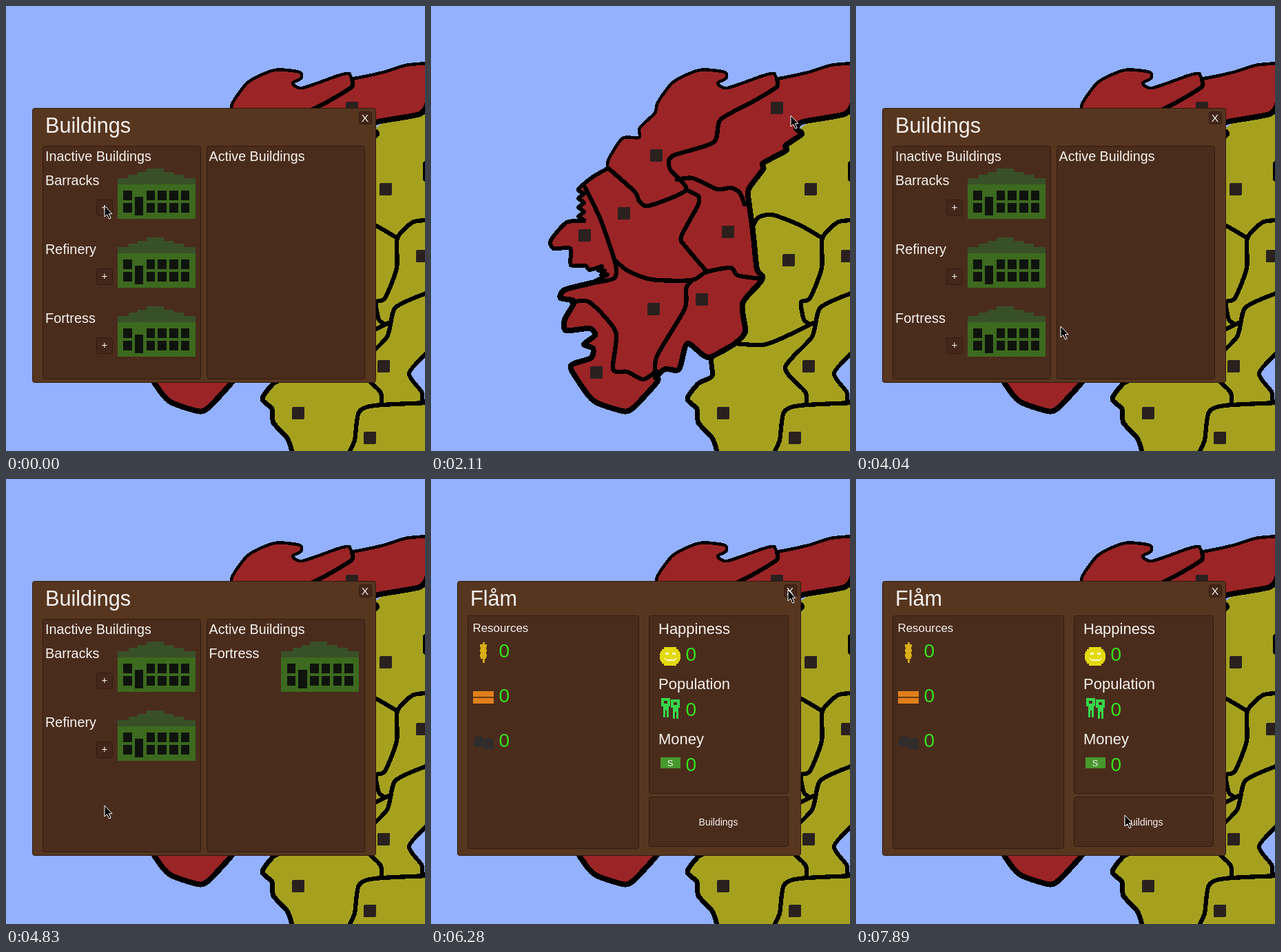
Animation of 608x646 px, one loop 8 s. Source, as an HTML page:

```html
<!DOCTYPE html>
<html lang="en">
<head>
<meta charset="utf-8">
<title>Province buildings</title>
<style>
html, body { margin: 0; width: 100%; height: 100%; overflow: hidden; background: #93b1ff; }
svg { display: block; width: 608px; height: 646px; }
text { font-family: "Liberation Sans", Arial, sans-serif; fill: #f6f2ef; }
</style>
</head>
<body>
<svg viewBox="0 0 608 646" xmlns="http://www.w3.org/2000/svg">
  <rect width="608" height="646" fill="#93b1ff"/>
  <g id="map" shape-rendering="crispEdges"></g>
  <g id="panel"></g>
  <path id="cursor" d="M0 0V16L3.7 12.6L6.6 19L9.2 17.9L6.4 11.7H11Z" fill="#000" stroke="#fff"/>
</svg>
<script>
const LOOP = 8000;
const SEA = '#93b1ff', RED = '#9b2426', OLIVE = '#a5a11f';
const INNER = '#4a2c1c', BUTTON = '#43271a', LIME = '#35e01c';
const $ = id => document.getElementById(id);

// ---------- drawing helpers ----------
const points = s => s.trim().split(/\s+/).map(p => p.split(',').map(Number));

// Smooth curve through a few key points
function curve(s) {
  const p = points(s);
  let d = 'M' + p[0];
  for (let i = 0; i < p.length - 1; i++) {
    const a = p[i - 1] || p[i], b = p[i], c = p[i + 1], e = p[i + 2] || c;
    const h = [0, 1].map(k => b[k] + (c[k] - a[k]) / 8);
    const g = [0, 1].map(k => c[k] - (e[k] - b[k]) / 8);
    d += `C${h} ${g} ${c}`;
  }
  return d;
}

// Serrated shore: every second point is pushed aside
function teeth(x, y, x2, y2, n, dx, dy) {
  return Array.from({ length: n + 1 }, (_, i) =>
    [x + (x2 - x) * i / n + i % 2 * dx, y + (y2 - y) * i / n + i % 2 * dy]).join(' ');
}

const line = (s, w) => `<path d="${curve(s)}" fill="none" stroke="#000" stroke-width="${w}" stroke-linejoin="round" stroke-linecap="round"/>`;
const area = (s, fill, close = '') => `<path d="${curve(s)}${close}Z" fill="${fill}"/>`;
const rect = (x, y, w, h, fill, extra = '') => `<rect x="${x}" y="${y}" width="${w}" height="${h}" fill="${fill}" ${extra}/>`;
const box = (x, y, x2, y2, fill) => rect(x + .5, y + .5, x2 - x, y2 - y, fill, 'rx="3" stroke="#301c10"');
const text = (x, y, size, s) => `<text x="${x}" y="${y}" font-size="${size}">${s}</text>`;
const label = (x, y, size, s) => `<text x="${x}" y="${y}" font-size="${size}" text-anchor="middle">${s}</text>`;

// ---------- map ----------
const north = `612,83 580,86 548,96 504,105 498,98 482,101 430,119 416,112 428,105 426,96 390,93
  352,110 329,140 325,155 303,177 302,191 278,192 258,222 256,236`;
const west = `256,236 235,248 ${teeth(214, 266, 214, 312, 7, 8, 0)} 197,314 174,340 178,352 202,352 203,376 224,377
  230,383 ${teeth(248, 378, 256, 390, 4, -7, 3)} 233,402`;
const south = `233,402 194,412 188,424 208,429 194,455 196,471 230,468 238,478 222,491 235,497 232,511 203,522
  214,545 236,573 270,586 290,586 328,546 328,537 340,527 360,527 372,490 402,510 440,491`;
const frontier = `440,491 456,473 452,432 478,401 481,392 473,382 469,345 466,318 462,290 461,266 482,237 482,228
  515,210 515,202 538,186 530,178 540,168 600,157 612,141`;
const shore = '440,491 408,510 408,537 388,548 372,570 386,585 388,605 408,627 416,650';
const bay = '612,502 585,533 603,560 604,572 612,574';

const borders = [
  '502,106 501,118 465,140 420,165 410,198 350,218 347,237 370,267 316,290 302,283 296,270 258,236',
  '357,252 380,250 415,266 435,264 448,271 455,288',
  '370,267 388,276 387,290 363,335 370,350 398,383',
  '268,370 285,384 320,397 378,398 400,386 435,380 445,391 478,396',
  '378,399 370,410 368,440 328,508 325,540',
  '224,264 246,310 267,372 266,395 235,402',
  '204,430 230,430 268,473 264,527 285,531 308,542 327,530',
  '468,318 475,307 495,303 535,318 568,337',
  '612,311 590,314 568,337 567,380 550,424 537,430 541,455 550,462',
  '612,416 565,438 553,480 514,525 543,560 545,577',
  '440,490 482,492 512,481 555,460',
  '612,576 535,580 512,590 506,630 498,648'
];
const towns = `502,148 327,217 280,301 223,333 431,328 393,426 323,440 240,532
  551,266 519,369 604,363 548,523 424,591 528,627`;

$('map').innerHTML =
  area(shore, OLIVE, 'L612 650V120L440 250') + area(bay, SEA) + line(bay, 6) +
  area([north, west, south, frontier].join(' '), RED) +
  line(north, 4.5) + line(west, 6) + line(south, 8) + line(frontier, 8) + line(shore, 7) +
  borders.map(s => line(s, 6.3)).join('') + line('609,229 609,251', 8) +
  points(towns).map(([x, y]) => rect(x - 9, y - 9, 18, 18, '#2a211f', 'rx="2"')).join('');

// ---------- panels ----------
const frame = title => box(38, 148, 536, 546, '#573620') + text(57, 184, 30.6, title) +
  box(512, 153, 530, 171, BUTTON) + label(521, 168, 15.5, 'X');

// Drawn on a grid of 27 by 16 cells
function house(x, y) {
  let s = rect(0, 5, 27, 11, '#3d6a1e') + rect(0, 3, 27, 2, '#385028');
  for (let i = 0; i < 3; i++) s += rect(10 - 3 * i, i, 6 + 6.5 * i, 1, '#385028');
  s += rect(6, 9, 3, 6, '#0f130d');
  for (const row of [7, 11]) {
    s += rect(2, row, 3, 3, '#0f130d');
    for (let col = 10; col < 25; col += 4) s += rect(col, row, 3, 3, '#0f130d');
  }
  return `<g transform="translate(${x} ${y}) scale(4.19 4.56)" shape-rendering="crispEdges">${s}</g>`;
}

function buildings(idle, active) {
  const row = (x, add) => (name, i) => {
    const y = 236 + i * 100;
    return text(x, y + 23.5, 19.9, name) + house(x + 104.7, y) +
      (add ? box(131, y + 45, 154, y + 68, BUTTON) + label(143, y + 61, 15, '+') : '');
  };
  return frame('Buildings') + box(53, 203, 282, 541, INNER) + box(291, 203, 520, 541, INNER) +
    text(57, 224.5, 19.8, 'Inactive Buildings') + text(294.5, 224.5, 19.7, 'Active Buildings') +
    idle.map(row(57, true)).join('') + active.map(row(294.5, false)).join('');
}

function wheat() {
  let s = rect(74.5, 237, 3, 30, '#d0a315');
  for (let i = 0; i < 6; i++) s += rect(71 + i % 2, 240 + i * 3.5, 10 - i % 2 * 2, 3.6, '#d9ae16');
  return s;
}
const planks = () => rect(61, 308, 30, 18, '#e07f1b') + rect(61, 316, 30, 2, '#6b3a12');
const coal = () => [62, 76].map((x, i) =>
  rect(x, 376 + 3 * i, 15, 13, '#302c2c') + rect(x + 3, 373 + 3 * i, 9, 4, '#302c2c')).join('');

function smiley() {
  let s = '';
  for (let y = -13.5; y < 13; y += 3) {
    const half = Math.round(Math.sqrt(225 - (y + 1.5) ** 2));
    s += rect(347 - half, 257.5 + y, 2 * half, 3, '#e4da10');
  }
  for (const x of [340, 350]) s += rect(x, 252, 5, 3, '#fbf8d0');
  for (const x of [339, 354]) s += rect(x, 260, 2, 2, '#fbf8d0');
  return s + rect(341, 262, 13, 2, '#fbf8d0');
}

function person(x, y) {
  const c = '#38d64c';
  return rect(x, y, 13, 12, c) + rect(x + 4, y + 4, 5, 4, INNER) + rect(x + 3, y + 12, 8, 16, c) +
    rect(x + 6, y + 18, 2, 10, INNER);
}

function province() {
  const icons = wheat() + planks() + coal() + smiley() + person(334, 318) + person(348, 320) +
    rect(333, 404, 29, 16, '#47982c');
  let s = frame('Flåm') + box(53, 198, 301, 536, INNER) + box(316, 198, 518, 456, INNER) +
    box(316, 461, 518, 533, INNER) + text(60.5, 221.5, 16.9, 'Resources') +
    label(417, 502.5, 14, 'Buildings') +
    `<g shape-rendering="crispEdges">${icons}</g>` + label(347, 417, 13, 'S');
  ['Happiness', 'Population', 'Money'].forEach((name, i) => {
    s += text(330, 225 + 80 * i, 22, name) +
      `<g style="--c:${LIME}">${zero(98.5, 259 + 65 * i)}${zero(369.5, 264 + 80 * i)}</g>`;
  });
  return s;
}
function zero(x, y) {
  return `<text x="${x}" y="${y}" font-size="28" style="fill:var(--c)">0</text>`;
}

// ---------- timeline ----------
const B = 'Barracks', R = 'Refinery', F = 'Fortress';
const list = (idle, active) => () => buildings(idle, active);
const none = () => '';
const scenes = [
  [0, list([B, R, F], [])], [170, list([R, F], [B])], [730, list([R], [B, F])],
  [1940, province], [2110, none], [3030, province],
  [3830, list([B, R, F], [])], [4740, list([B, R], [F])], [5450, list([R], [F, B])],
  [6280, province], [6470, none], [7480, province]
];

// Pointer targets
const plus = i => [143, 290 + 100 * i];
const CLOSE = [522, 159], OPEN = [390, 488], TOWN = [320, 442];

const smooth = u => u * u * (3 - 2 * u);
const start = u => u ** 1.4;
const brake = u => 1 - (1 - u) ** 2;
const moves = [
  [170, 560, plus(1), smooth],
  [730, 1380, [460, 190], start], [1380, 1500, [503, 177], brake], [1560, 1790, CLOSE, smooth],
  [2110, 2910, TOWN, smooth], [3030, 3680, OPEN, smooth],
  [3830, 4040, [298, 465], start], [4040, 4500, plus(2), brake],
  [4740, 5270, plus(0), smooth],
  [5450, 5630, [449, 232], start], [5630, 6010, [518, 161], brake],
  [6470, 7170, TOWN, smooth], [7480, 7890, OPEN, smooth]
];

function pointer(t) {
  let pos = plus(0);
  for (const [a, b, goal, ease] of moves) {
    if (t < a) break;
    const u = ease(Math.min(1, (t - a) / (b - a)));
    pos = pos.map((v, i) => v + (goal[i] - v) * u);
  }
  return pos.map(Math.round);
}

let shown = null;
function draw(t) {
  const scene = scenes.filter(s => s[0] <= t).pop();
  if (scene !== shown) {
    $('panel').innerHTML = scene[1]();
    shown = scene;
  }
  $('cursor').setAttribute('transform', `translate(${pointer(t).join(' ')})`);
}

const begin = performance.now();
function tick() {
  draw((performance.now() - begin) % LOOP);
  requestAnimationFrame(tick);
}
tick();
</script>
</body>
</html>
```
